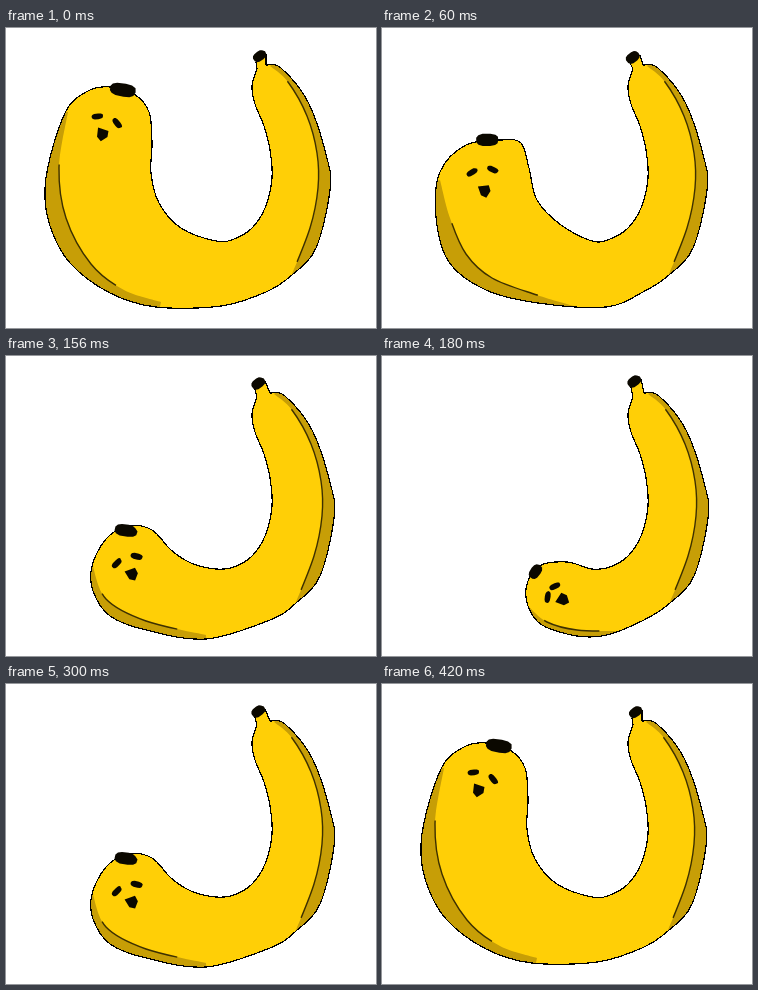
An HTML page for the animation above (480 ms loop, 370x300 px).

```html
<!DOCTYPE html>
<html lang="en">
<head>
<meta charset="utf-8">
<title>Bending banana</title>
<style>
  html, body { margin: 0; width: 100%; height: 100%; overflow: hidden; background: #fff; }
  svg { display: block; width: 100vw; height: 100vh; }
  .skin { fill: #ffcf06; }
  .shade { fill: #c79e06; }
  .edge, .crease { fill: none; stroke-linejoin: round; }
  .edge { stroke: #000; stroke-width: 1.2; shape-rendering: crispEdges; }
  .crease { stroke: #3d3000; stroke-width: 1.4; }
  .ink { fill: #0b0800; }
</style>
</head>
<body>
<svg viewBox="0 0 370 300">
  <clipPath id="inside"><path id="clip"/></clipPath>
  <path id="skin" class="skin"/>
  <path id="shade" class="shade" clip-path="url(#inside)"/>
  <path id="headCrease" class="crease" pathLength="100" stroke-dasharray="0 22 58 100"/>
  <path id="tailCrease" class="crease" pathLength="100" stroke-dasharray="0 10 82 100"/>
  <path id="edge" class="edge"/>
  <path id="ink" class="ink"/>
</svg>
<script>
const points = text => text.trim().split(/\s+/).map(p => p.split(',').map(Number));

// The tail barely moves: every pose shares it, shifted sideways by its sway.
const tail = {
  outer: points('262,37 277,40 304,74 323,130 326,162 312,220 288,247 262,264'),
  inner: points('210,213 228,211 246,200 259,180 266,150 264,122 258,98 249,76 246,58 251,41'),
  rim: points('266,38 284,54 303,88 313,125 314,160 306,200 286,251')
};

// head: outline from belly round to throat; rim: inner border of its shaded side
// cap: centre, size, turn; face: point between the eyes, turn, eye spacing, mouth drop
const upright = {
  sway: -2, tip: [253, 28], cap: [116, 62, 27, 14, 10], face: [101, 92, 19, 21, 16],
  head: `215,278 150,279 104,265 64,235 44,198 39,160 48,115 63,78 84,62
    104,59 128,66 143,84 146,115 145,145 153,175 175,200`,
  rim: '62,84 53,140 60,190 85,236 118,262 155,274'
};
const leaning = {
  sway: -1, tip: [251, 29], cap: [106, 112, 22, 12, 0], face: [100, 143, -7, 21, 21],
  head: `224,279 156,275 104,262 67,234 54,189 58,144 84,117
    119,112 139,115 147,140 155,172 179,197`,
  rim: '58,152 68,190 84,226 110,250 155,267 195,279'
};
const low = {
  sway: 2, tip: [252, 27], cap: [120, 174, 22, 12, 8], face: [121, 204, -19, 21, 16],
  head: '200,283 140,274 104,260 87,235 86,210 100,183 122,170 146,174 165,194 185,207',
  rim: '86,207 100,243 140,265 200,279'
};
const curled = {
  sway: 0, tip: [252, 25], cap: [153, 216, 16, 11, -55], face: [169, 236, -57, 13, 15],
  head: '225,279 195,280 160,269 146,250 145,228 157,210 185,206',
  rim: '146,250 165,266 195,274 237,275'
};

// Catmull-Rom curve through the given points
const smooth = p => 'M' + p[0] + p.slice(1).map((b, i) => {
  const a = p[i], before = p[i - 1] || a, after = p[i + 2] || b;
  const c1 = a.map((v, k) => v + (b[k] - before[k]) / 6);
  const c2 = b.map((v, k) => v - (after[k] - a[k]) / 6);
  return `C${c1} ${c2} ${b}`;
}).join('');

const polygon = p => 'M' + p.join('L') + 'Z';
const shift = (p, dx) => p.map(([x, y]) => [x + dx, y]);

function place([x, y], cx, cy, turn) {
  const a = turn * Math.PI / 180, c = Math.cos(a), s = Math.sin(a);
  return [cx + x * c - y * s, cy + x * s + y * c];
}

// Scribbled spot: a boxy ellipse with an uneven rim
function blob(cx, cy, w, h, turn) {
  const count = 13;
  const box = v => Math.sign(v) * Math.abs(v) ** 0.75;
  return polygon(Array.from({ length: count }, (_, i) => {
    const a = i / count * 2 * Math.PI, r = 0.5 + 0.05 * Math.sin(i * 12.9 + cx);
    return place([w * r * box(Math.cos(a)), h * r * box(Math.sin(a))], cx, cy, turn);
  }));
}

function drawFace([cx, cy, turn, gap, drop]) {
  const at = (x, y) => place([x, y], cx, cy, turn);
  const mouth = [[-6, -6], [5, -6], [6, 0], [1, 6], [-4, 3]];
  return blob(...at(-gap / 2, 0), 12, 6, turn - 25)
    + blob(...at(gap / 2, 0), 12, 6, turn + 33)
    + polygon(mouth.map(([x, y]) => at(x, y + drop)));
}

// Shade everything from the rim outwards; the skin clips the excess
function shadeBeyond(rim) {
  const far = rim.map(([x, y]) => [190 + (x - 190) * 1.6, 110 + (y - 110) * 1.6]);
  return smooth(rim) + 'L' + far.reverse().join('L') + 'Z';
}

function build({ sway, tip: [tx, ty], cap, face, head, rim }) {
  const outline = [...shift(tail.outer, sway), ...points(head), ...tail.inner];
  const body = smooth(outline) + `L${tx - 3},${ty + 6}L${tx + 7},${ty - 2}Z`;
  const headRim = points(rim), tailRim = shift(tail.rim, sway);
  return {
    clip: body, skin: body, edge: body,
    shade: shadeBeyond(headRim) + shadeBeyond(tailRim),
    headCrease: smooth(headRim),
    tailCrease: smooth(tailRim),
    ink: blob(...cap) + blob(tx, ty, 14, 10, -38) + drawFace(face)
  };
}

const STEP = 60;
const swing = [upright, leaning, low, curled].map(build);
const steps = [...swing, ...swing.slice().reverse()];
let shown;

function draw(time) {
  const pose = steps[Math.floor(time / STEP) % steps.length];
  if (pose === shown) return;
  shown = pose;
  for (const id in pose) document.getElementById(id).setAttribute('d', pose[id]);
}

let start;
function tick(now) {
  start ??= now;
  draw(now - start);
  requestAnimationFrame(tick);
}
draw(0);
requestAnimationFrame(tick);
</script>
</body>
</html>
```
